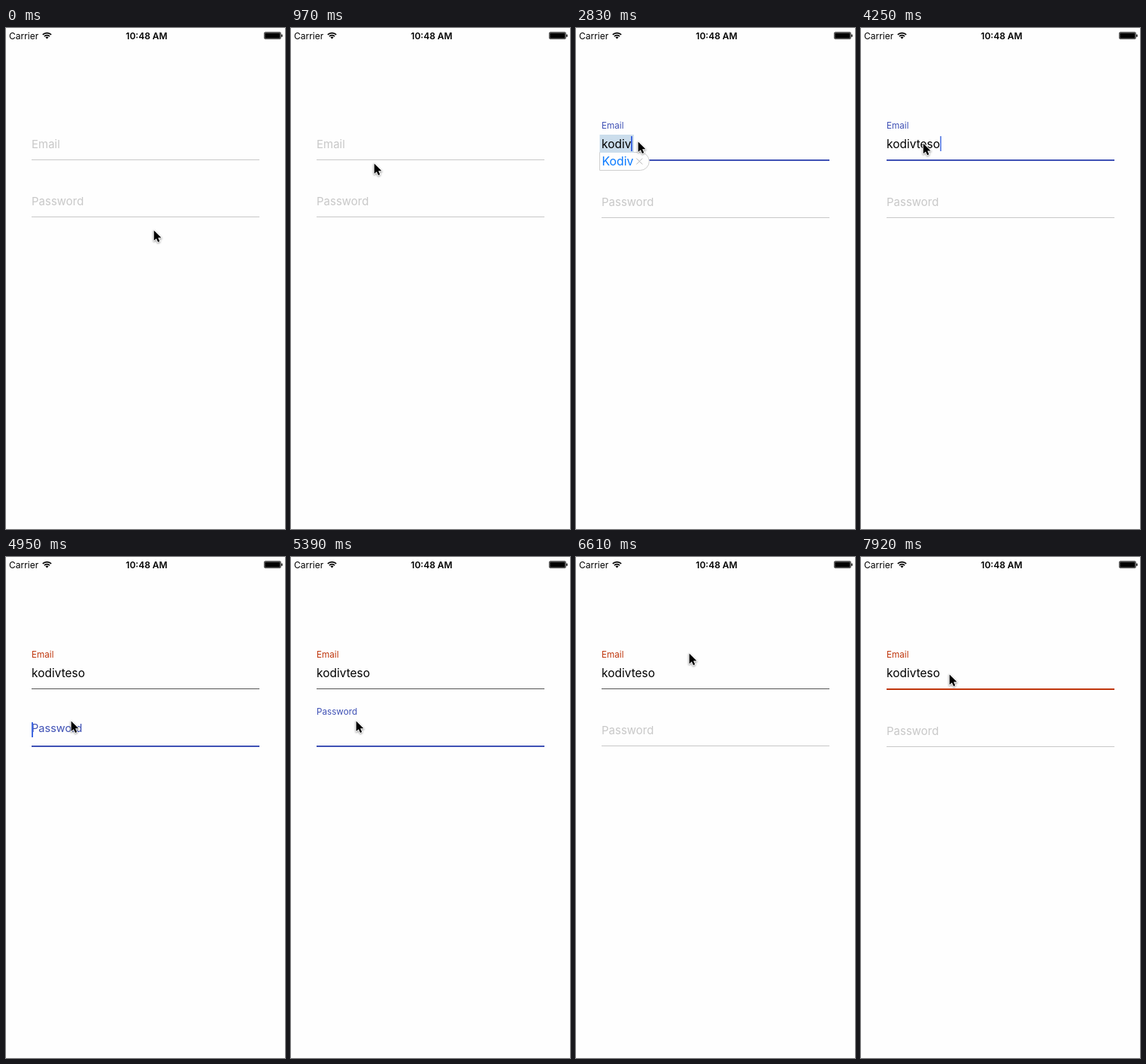
An HTML page with a canvas for the animation above (8 s loop, 371x667 px).

```html
<!DOCTYPE html>
<html lang="en">
<head>
<meta charset="utf-8">
<title>Floating label form</title>
<style>
  html, body { margin: 0; width: 100%; height: 100%; overflow: hidden; background: #fefefe; }
  canvas { display: block; width: 371px; height: 667px; }
</style>
</head>
<body>
<canvas id="stage"></canvas>
<script>
const WIDTH = 371, HEIGHT = 667, LOOP = 8000, TICK = 88;
const LEFT = 34, RIGHT = 337;
const GREY = '#c8c8c8', INDIGO = '#3f51b5', RED = '#bf360c', DARK = '#555', CARET = '#4169e1';
const FONT = 'Inter, "Open Sans", sans-serif';

const FOCUS_EMAIL = 1500, FOCUS_PASSWORD = 4950, BLUR = 5820, REFOCUS = 7480;
const VALUE = 'kodivteso', SUGGESTION = 'Kodiv';
const KEY_TIMES = [2120, 2300, 2480, 2660, 2830, 3370, 3550, 3630, 3720];
const BLINKS = [1770, 4250, 5220, 7750];
const POINTER = [
  [0, 196, 269], [470, 196, 269], [1250, 82, 151], [4190, 82, 151], [4780, 86, 218],
  [5940, 86, 218], [6350, 148, 72], [6620, 150, 128], [7060, 117, 156], [LOOP, 117, 156]
];

const canvas = document.getElementById('stage');
const ctx = canvas.getContext('2d');
const dpr = window.devicePixelRatio || 1;
canvas.width = WIDTH * dpr;
canvas.height = HEIGHT * dpr;

const ramp = (t, from, to) => Math.min(1, Math.max(0, (t - from) / (to - from)));
const smooth = u => u * u * (3 - 2 * u);
const lerp = (a, b, u) => a + (b - a) * u;
const glide = (t, start) => smooth(ramp(t, start, start + 300));

function rect(x, y, w, h, color) {
  ctx.fillStyle = color;
  ctx.fillRect(x, y, w, h);
}

function text(string, x, y, size, color, weight = 400) {
  ctx.font = `${weight} ${size}px ${FONT}`;
  ctx.fillStyle = color;
  ctx.fillText(string, x, y);
  return ctx.measureText(string).width;
}

function drawStatusBar() {
  text('Carrier', 4, 14.5, 12, '#000');
  ctx.textAlign = 'center';
  text('10:48 AM', 187, 14.5, 12, '#000', 600);
  ctx.textAlign = 'left';

  // Wi-Fi
  const from = -Math.PI * 0.75, to = -Math.PI * 0.25;
  ctx.strokeStyle = '#000';
  ctx.lineWidth = 1.8;
  for (const radius of [8, 5]) {
    ctx.beginPath();
    ctx.arc(54.5, 14.6, radius, from, to);
    ctx.stroke();
  }
  ctx.beginPath();
  ctx.moveTo(54.5, 14.6);
  ctx.arc(54.5, 14.6, 2.9, from, to);
  ctx.fillStyle = '#000';
  ctx.fill();

  // Battery
  ctx.lineWidth = 0.7;
  ctx.beginPath();
  ctx.roundRect(343.4, 5.6, 22, 9, 1.5);
  ctx.stroke();
  rect(344.2, 6.4, 20.4, 7.4, '#000');
  rect(366.2, 8.6, 1.4, 3.2, '#000');
}

function drawField(label, lineY, float, labelColor, lineColor, focused) {
  text(label, LEFT, lerp(lineY - 14.7, lineY - 40.6, float), lerp(15, 11.7, float), labelColor);
  rect(LEFT, lineY, RIGHT - LEFT, focused ? 2 : 1, lineColor);
}

function drawSuggestion(shown) {
  const width = text(shown, LEFT + 0.5, 183, 15.8, '#0a7aff');
  const right = LEFT + width + 21.5;
  ctx.beginPath();
  ctx.roundRect(31.5, 165.5, right - 31.5, 24, [0, 12, 12, 0]);
  ctx.fillStyle = '#fefefe';
  ctx.fill();
  ctx.strokeStyle = '#cfcfcf';
  ctx.lineWidth = 1;
  ctx.stroke();
  text(shown, LEFT + 0.5, 183, 15.8, '#0a7aff');

  const x = right - 13;
  ctx.beginPath();
  ctx.moveTo(x - 4, 173.5);
  ctx.lineTo(x + 4, 181.5);
  ctx.moveTo(x + 4, 173.5);
  ctx.lineTo(x - 4, 181.5);
  ctx.strokeStyle = '#b8b8b8';
  ctx.stroke();
}

function drawCaret(t, x, y) {
  const start = BLINKS.filter(b => t >= b - 60).pop() ?? LOOP;
  ctx.globalAlpha = 1 - ramp(t, start - 60, start + 170) + ramp(t, start + 200, start + 360);
  rect(x, y, 2, 20, CARET);
  ctx.globalAlpha = 1;
}

function drawPointer(t) {
  const next = POINTER.findIndex(key => key[0] > t);
  const [t0, x0, y0] = POINTER[next - 1], [t1, x1, y1] = POINTER[next];
  const u = smooth(ramp(t, t0, t1));
  ctx.save();
  ctx.translate(lerp(x0, x1, u) + 0.7, lerp(y0, y1, u) + 0.5);
  const arrow = new Path2D('M0 0V13.6L3.2 10.7L5.4 15.5L7.6 14.5L5.5 9.8H9.8Z');
  ctx.lineWidth = 1.8;
  ctx.lineJoin = 'round';
  ctx.strokeStyle = '#fff';
  ctx.shadowColor = 'rgba(0,0,0,.45)';
  ctx.shadowBlur = 2.5 * dpr;
  ctx.shadowOffsetY = dpr;
  ctx.stroke(arrow);
  ctx.shadowColor = 'transparent';
  ctx.fillStyle = '#000';
  ctx.fill(arrow);
  ctx.restore();
}

function draw(t) {
  ctx.setTransform(dpr, 0, 0, dpr, 0, 0);
  rect(0, 0, WIDTH, HEIGHT, '#fefefe');
  drawStatusBar();

  const refocused = t >= REFOCUS;
  const emailFocused = t >= FOCUS_EMAIL && t < FOCUS_PASSWORD || refocused;
  const passwordFocused = t >= FOCUS_PASSWORD && t < BLUR;
  const invalid = t >= FOCUS_PASSWORD;
  const activeColor = invalid ? RED : INDIGO;
  const emailLabel = t < FOCUS_EMAIL ? GREY : activeColor;
  const emailLine = emailFocused ? activeColor : invalid ? DARK : GREY;
  const passwordColor = passwordFocused ? INDIGO : GREY;
  const passwordY = emailFocused ? 252 : 251;

  drawField('Email', 175, glide(t, 1465), emailLabel, emailLine, emailFocused);
  drawField('Password', passwordY, glide(t, 4890) - glide(t, 5748),
    passwordColor, passwordColor, passwordFocused);

  const typed = VALUE.slice(0, KEY_TIMES.filter(time => t >= time).length);
  const suggesting = t >= KEY_TIMES[3] && t < KEY_TIMES[5];
  ctx.font = `400 15.5px ${FONT}`;
  const typedWidth = ctx.measureText(typed).width;
  if (suggesting) {
    drawSuggestion(SUGGESTION.slice(0, typed.length));
    rect(31.5, 142, typedWidth + 6, 24, '#cbddec');
  }
  text(typed, LEFT, 160, 15.5, '#000');

  if (emailFocused) drawCaret(t, LEFT + Math.round(typedWidth), 144);
  if (passwordFocused) drawCaret(t, LEFT, 220);
  drawPointer(t);
}

function frame() {
  const elapsed = performance.now() % LOOP;
  draw(Math.min(LOOP - 1, Math.floor(elapsed / TICK) * TICK + 30));
  requestAnimationFrame(frame);
}
frame();
</script>
</body>
</html>
```
